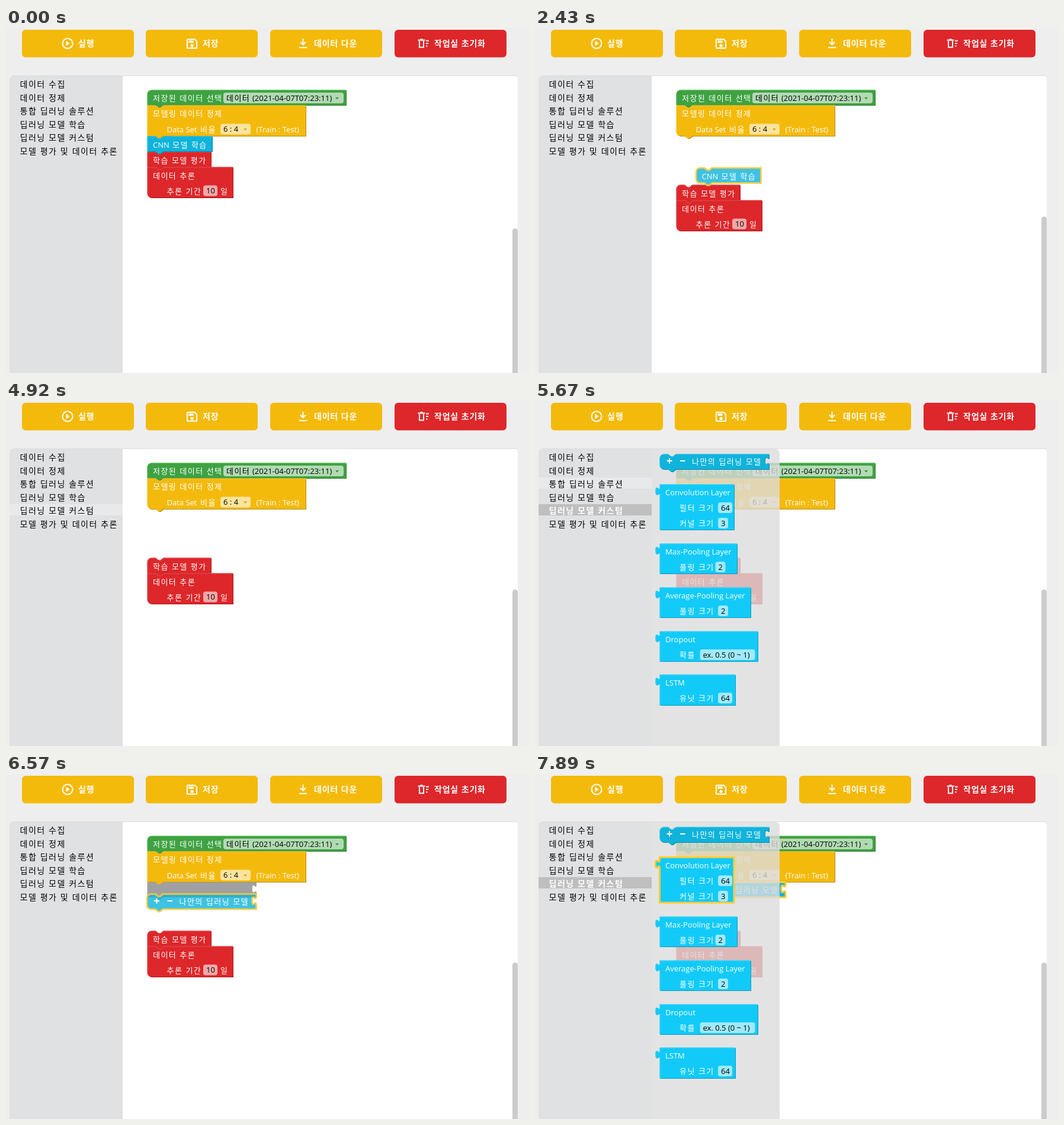
Write an HTML page that moves like this. It is 883 px wide and 582 px high and loops after 8 s.

```html
<!DOCTYPE html>
<html lang="ko">
<head>
<meta charset="utf-8">
<title>블록 편집기</title>
<style>
  html, body { margin: 0; width: 100%; height: 100%; overflow: hidden; background: #eeeeee; }
  svg { display: block; }
  text { font: 13px 'Open Sans', 'Noto Sans CJK KR', 'Noto Sans CJK', sans-serif; white-space: pre; }
  .ko { font-family: 'Noto Sans CJK KR', 'Noto Sans CJK', sans-serif; font-weight: 500; letter-spacing: 1.45px; }
  .menu { font-size: 14px; font-weight: 400; letter-spacing: 1.5px; }
  .button { font-size: 14px; font-weight: 700; letter-spacing: .8px; }
  .icon { fill: none; stroke: #fff; stroke-width: 2; }
  .solid { fill: #fff; stroke: none; }
  .light { fill: none; stroke-width: 1; }
  .selected .main { stroke: #fc3; stroke-width: 3; }
  .selected .light, .marker .light, .marker .dark, .dragging .light, .dragging .dark { display: none; }
  .dragging .main { fill-opacity: .8; stroke-opacity: .8; }
</style>
</head>
<body>
<svg id="stage" width="883" height="582" viewBox="0 0 883 582"></svg>
<script>
const LOOP = 8000, STEP = 30;
const GREEN = [122, 44, 44], YELLOW = [45, 91, 50], CYAN = [192, 87, 46],
      RED = [359, 73, 51], SKY = [192, 94, 52], GREY = [220, 1, 63];
const stage = document.getElementById('stage');

function add(parent, tag, attrs = {}, text) {
  const el = document.createElementNS('http://www.w3.org/2000/svg', tag);
  for (const key in attrs) el.setAttribute(key, attrs[key]);
  if (text) el.textContent = text;
  parent.appendChild(el);
  return el;
}
const rect = (parent, x, y, width, height, fill, rx = 0) =>
  add(parent, 'rect', { x, y, width, height, fill, rx });
const isKorean = str => /[가-힣]/.test(str);
const label = (parent, x, y, str, fill = '#fff', kind = '') =>
  add(parent, 'text', { x, y: y + 4.8, fill, class: (isKorean(str) ? 'ko ' : 'en ') + kind }, str);
const show = (el, on) => { el.style.display = on ? '' : 'none'; };
const place = (el, x, y) => el.setAttribute('transform', `translate(${x} ${y})`);
const hsl = ([h, s, l], gain = 1) => `hsl(${h} ${s}% ${Math.min(l * gain, 90)}%)`;

// Outline of a puzzle block, plus its lit top-left edge.
function outline({ w, h, tl, bl, notch, foot, socket, tab }) {
  const dip = notch ? 'H14 l5,4 h3 l5,-4 ' : '';
  const corner = tl ? 'V7 a7,7 0 0 1 7,-7 ' : 'V0 ';
  const plug = tab ? 'V18.1 c0,-9 -7.2,7 -7.2,-6.8 s7.2,2.3 7.2,-6.8 ' : '';
  const edge = plug + corner + dip + `H${w} `;
  const base = bl ? h - 7 : h;
  const full = `M0,${base} ` + edge +
    (socket ? 'v4.5 c0,9 -7.2,-7 -7.2,6.8 s7.2,-2.3 7.2,6.8 ' : '') + `V${h} ` +
    (foot ? 'H27 l-5,4 h-3 l-5,-4 ' : '') +
    (bl ? 'H7 a7,7 0 0 1 -7,-7 z' : 'H0 z');
  return { full, edge: `M0,${base} ` + edge };
}

// labels: [x, y, text, fill]; fields: [x, y, width, text, arrow x]
function block(parent, color, shape, labels = [], fields = []) {
  const g = add(parent, 'g');
  const body = add(g, 'g');
  place(body, -.5, -.5);
  const dark = add(body, 'path', { fill: hsl(color, .75), class: 'dark', transform: 'translate(1 1)' });
  const main = add(body, 'path', { fill: hsl(color), class: 'main' });
  const light = add(body, 'path', { class: 'light', stroke: hsl(color, 1.2), transform: 'translate(.5 .5)' });
  // The shaded rim is part of the block's outer size.
  const w = shape.w - .5, h = shape.h - .5;
  let key;
  g.form = (tl, bl) => {
    if (key === `${tl}${bl}`) return;
    key = `${tl}${bl}`;
    const { full, edge } = outline({ ...shape, w, h, tl, bl });
    dark.setAttribute('d', full);
    main.setAttribute('d', full);
    light.setAttribute('d', edge);
  };
  g.form(!!shape.tl, !!shape.bl);
  g.select = on => g.classList.toggle('selected', on);
  g.drag = on => g.classList.toggle('dragging', on);
  g.fields = fields.map(([x, y, width, str, arrow]) => {
    const box = rect(g, x, y - 9, width, 18, '#fff', 4);
    box.setAttribute('fill-opacity', .6);
    if (str) label(g, x + 5, y, str, '#000');
    if (arrow) add(g, 'path', { d: `M${arrow - 3},${y - 1} h6 l-3,3.5 z`, fill: hsl(color, .9) });
    return box;
  });
  labels.forEach(([x, y, str, fill]) => label(g, x, y, str, fill));
  return g;
}

function customBlock(parent) {
  const g = block(parent, CYAN, { w: 185, h: 26, tl: true, bl: true, notch: true, foot: true, socket: true },
    [[54, 12.5, '나만의 딥러닝 모델']]);
  add(g, 'path', { class: 'icon', d: 'M11.5,11 h9 M16,6.5 v9 M34,11 h8.5' });
  return g;
}

// Toolbar
[[27, '실행', 122], [236, '저장', 332], [446, '데이터 다운', 520], [656, '작업실 초기화', 723]]
  .forEach(([x, str, tx], i) => {
    rect(stage, x, 3, 189, 46.5, hsl(i < 3 ? YELLOW : RED), 6);
    label(stage, tx, 26.2, str, '#fff', 'button');
  });
add(stage, 'circle', { class: 'icon', cx: 104, cy: 26, r: 8.5 });
add(stage, 'path', { class: 'solid', d: 'M101.5,21.8 v8.4 l6,-4.2 z' });
add(stage, 'path', { class: 'icon', d: 'M307,19 h11.5 l3.5,3.5 V33 a1,1 0 0 1 -1,1 H307 a1,1 0 0 1 -1,-1 V20 a1,1 0 0 1 1,-1 z' });
add(stage, 'path', { class: 'solid', d: 'M308.5,21 h8 v4 h-8 z M314,27 a2.6,2.6 0 1 0 .1,0 z' });
add(stage, 'path', { class: 'icon', d: 'M495,33 h13 M501.5,18 v8 M497,23.5 l4.5,4.5 4.5,-4.5' });
add(stage, 'path', { class: 'icon', d: 'M698,22 v10.5 h7 V22 M695.5,20.5 h12 M699.5,19 h4 M709,21.5 h5 M709,26 h4 M709,30.5 h2.5' });

// Workspace and side menu
add(stage, 'path', { d: 'M6,582 V88 a8,8 0 0 1 8,-8 H860 a5,5 0 0 1 5,5 V582 z', fill: '#dcdcdc' });
add(stage, 'path', { d: 'M197,582 V81 H860 a4,4 0 0 1 4.5,4.5 V582 z', fill: '#fff' });
add(stage, 'path', { d: 'M6,582 V89 a8,8 0 0 1 8,-8 H197 V582 z', fill: '#dfe1e2' });
const scrollbar = rect(stage, 855, 338, 9, 300, '#cccccc', 4.5);

const rows = ['데이터 수집', '데이터 정제', '통합 딥러닝 솔루션', '딥러닝 모델 학습', '딥러닝 모델 커스텀', '모델 평가 및 데이터 추론']
  .map((str, i) => {
    const y = 84 + i * 22.5;
    const back = rect(stage, 6, y, 191, 19, '#e8e9ea');
    return { back, text: label(stage, 23.5, y + 11.5, str, '#000', 'menu') };
  });

// Blocks on the workspace
const canvas = add(stage, 'g');
const green = block(canvas, GREEN, { w: 336, h: 26, tl: true, foot: true },
  [[9, 13, '저장된 데이터 선택'], [133, 13.5, '데이터', '#000'], [177, 13.5, '(2021-04-07T07:23:11)', '#000']],
  [[128, 13, 203, '', 320]]);
const yellow = block(canvas, YELLOW, { w: 268, h: 52, notch: true, foot: true },
  [[9, 13, '모델링 데이터 정제'], [32.5, 40, 'Data Set'], [89, 40, '비율'], [183.5, 40, '(Train : Test)']],
  [[123, 39.5, 51, '6 : 4', 165]]);
const markers = [107, 110, 185].map(w => {
  const g = block(canvas, GREY, { w, h: 26, notch: true, foot: true, socket: w === 185 });
  g.classList.add('marker');
  return g;
});
const redStack = add(canvas, 'g');
const red = block(redStack, RED, { w: 108, h: 26, notch: true, foot: true }, [[9, 14, '학습 모델 평가']]);
const infer = block(redStack, RED, { w: 145, h: 52, notch: true, bl: true },
  [[9, 14, '데이터 추론'], [32.5, 40, '추론 기간'], [123, 40, '일']],
  [[94, 39.5, 24, '10']]);
const cnn = block(canvas, CYAN, { w: 110, h: 26, notch: true, foot: true }, [[9, 14, 'CNN'], [42, 14, '모델 학습']]);
const custom = customBlock(canvas);
place(green, 239, 105);
place(infer, 0, 26);

// Flyout
const flyout = add(stage, 'g');
add(flyout, 'path', { d: 'M197,81 H406 a7,7 0 0 1 7,7 V582 H197 z', fill: '#ddd', 'fill-opacity': .8 });
const flyCustom = customBlock(flyout);
place(flyCustom, 211, 90);
const layer = (y, w, h, title, rest, fields) => {
  const g = block(flyout, SKY, { w, h, tab: true }, [[9, 13.5, title], ...rest], fields);
  place(g, 211, y);
  return g;
};
const conv = layer(141, 126, 77, 'Convolution Layer', [[33, 39, '필터 크기'], [33, 65, '커널 크기']],
  [[98, 39, 24, '64'], [98, 65, 17, '3']]);
layer(241, 131, 51, 'Max-Pooling Layer', [[33, 39, '풀링 크기']], [[93.5, 39, 17, '2']]);
layer(315, 154, 51, 'Average-Pooling Layer', [[33, 39, '풀링 크기']], [[98, 39, 17, '2']]);
layer(389, 166, 51, 'Dropout', [[33, 39, '확률']], [[67.5, 39, 93, 'ex. 0.5 (0 ~ 1)']]);
layer(462, 128, 52, 'LSTM', [[33, 39, '유닛 크기']], [[98, 39, 24, '64']]);

// Timeline: [ms, x, y] for drags, [ms, row] for the pointer over the menu
const redPath = [[1290, 239, 209], [1320, 236, 203], [1380, 237, 214], [1470, 238, 238], [1590, 239, 262], [1620, 239, 265]];
const cnnPath = [[2250, 239, 183], [2280, 240, 177], [2340, 246, 192], [2430, 272.5, 236.5], [2520, 335, 325],
  [2640, 475, 460], [2760, 607, 566]];
const customPath = [[6240, 218.5, 108.5], [6330, 226, 131], [6420, 233, 160], [6510, 238, 194], [6570, 238.5, 203],
  [6660, 239, 202]];
const hovers = [[0, 0], [3840, 4], [3930, 3], [3990, 2], [4020, 1], [4110, 2], [4140, 3], [4200, 2], [4260, 0], [4320, 1],
  [4470, 2], [4530, 3], [4560, 0], [4620, 4], [4890, 0], [4920, 5], [5430, 0], [5640, 4], [5670, 3], [5700, 2],
  [5760, 1], [5790, 0], [6930, 6], [6960, 5], [6990, 4], [7050, 5], [7080, 0], [7110, 6], [7320, 0], [7350, 5], [7650, 0]];

function along(path, t) {
  const i = path.findIndex(p => p[0] > t);
  if (i === 0) return path[0].slice(1);
  if (i < 0) return path[path.length - 1].slice(1);
  const [t0, x0, y0] = path[i - 1], [t1, x1, y1] = path[i];
  const k = (t - t0) / (t1 - t0);
  return [x0 + (x1 - x0) * k, y0 + (y1 - y0) * k];
}

function render(t) {
  const within = (a, b) => t >= a && t < b;
  const open = within(5430, 6240) || t >= 7650;

  const hovered = hovers.filter(h => h[0] <= t).pop()[1];
  rows.forEach(({ back, text }, i) => {
    const chosen = open && i === 4;
    show(back, chosen || hovered === i + 1);
    back.setAttribute('fill', chosen ? '#bfbfbf' : '#e8e9ea');
    text.setAttribute('fill', chosen ? '#fff' : '#000');
    text.style.fontWeight = chosen ? 700 : 400;
  });
  scrollbar.setAttribute('y', t < 1620 ? 338 : 318);

  const pushed = within(6270, 6420);
  place(yellow, 239, pushed ? 157 : 131);
  yellow.form(false, within(2370, 6420));

  place(redStack, ...along(redPath, t));
  red.drag(within(1320, 1620));
  infer.drag(within(1320, 1620));
  red.form(t >= 1320, false);
  red.select(within(990, 1980));
  const field = infer.fields[0];
  field.setAttribute('stroke', within(540, 630) ? '#fff' : 'none');
  field.setAttribute('stroke-width', 2);

  show(cnn, t < 2790);
  place(cnn, ...along(cnnPath, t));
  cnn.drag(t >= 2280);
  cnn.form(t >= 2280, t >= 1470);
  cnn.select(t >= 1980);

  const dropped = t >= 6870;
  show(custom, t >= 6240);
  place(custom, ...(dropped ? [239, 183] : along(customPath, t)));
  custom.drag(!dropped);
  custom.form(!dropped, true);
  custom.select(true);

  show(markers[0], within(1320, 1470));
  place(markers[0], 239, 209);
  show(markers[1], within(2280, 2370));
  place(markers[1], 239, 183);
  show(markers[2], within(6270, 6870));
  place(markers[2], 239, pushed ? 131 : 183);

  show(flyout, open);
  flyCustom.select(within(5940, 6240));
  conv.select(t >= 7890);
}

const start = performance.now();
function tick() {
  const t = (performance.now() - start) % LOOP;
  render(Math.floor(t / STEP) * STEP);
  requestAnimationFrame(tick);
}
tick();
</script>
</body>
</html>
```
